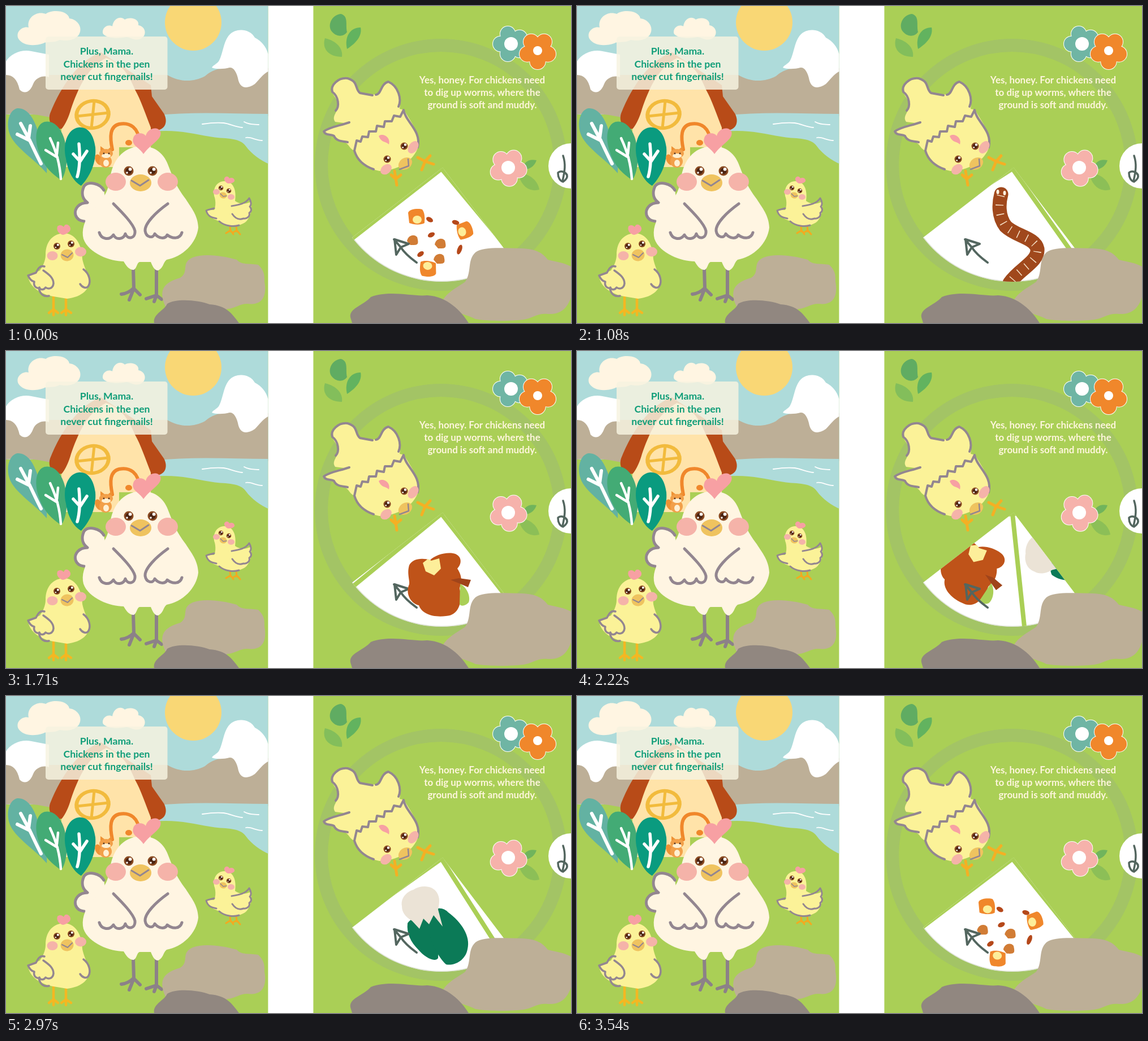
An HTML page with a canvas that plays this animation: 999x561 px, repeating every 4.17 s.

```html
<!DOCTYPE html>
<html lang="en">
<head>
<meta charset="utf-8">
<title>Chicken wheel book</title>
<style>
html, body { margin: 0; width: 100%; height: 100%; overflow: hidden; background: #fff; }
canvas { display: block; width: 999px; height: 561px; }
</style>
</head>
<body>
<canvas id="stage" width="999" height="561"></canvas>
<script>
const stage = document.getElementById('stage');
let g = stage.getContext('2d');
const GRASS = '#aacf56', LINE = '#938690', CREAM = '#fff5e2', CHICK = '#fbf298';
const PINK = '#f5b3a9', COMB = '#f7a0a3', SKY = '#aedbda', SAND = '#bdaf97';
const STONE = '#918780', ORANGE = '#f0872b', RUST = '#b84b18', INK = '#53665f';
const WALL = '#ffe3a9';
const LOOP = 4170, STEP = 30, HUB = [770, 288], RAD = Math.PI / 180;

function fill(color, d) {
  g.fillStyle = color;
  g.fill(new Path2D(d));
}
function line(color, width, d) {
  g.strokeStyle = color;
  g.lineWidth = width;
  g.lineCap = g.lineJoin = 'round';
  g.stroke(new Path2D(d));
}
function oval(color, x, y, rx, ry = rx, deg = 0) {
  g.fillStyle = color;
  g.beginPath();
  g.ellipse(x, y, rx, ry, deg * RAD, 0, 7);
  g.fill();
}
function eye(x, y, r) {
  oval('#8a4a22', x, y, r);
  oval('#4b2412', x, y, r * .65);
  oval('#fff', x + r * .3, y - r * .38, r * .34);
  oval('#fff', x - r * .35, y + r * .35, r * .2);
}
function text(rows, size, color, x, y, gap) {
  g.font = `bold ${size}px Lato, "Open Sans", sans-serif`;
  g.textAlign = 'center';
  g.fillStyle = color;
  rows.forEach((row, i) => g.fillText(row, x, y + i * gap));
}
function flower(x, y, r, color, deg, core) {
  for (const [c, extra] of [['#fff', 1], [color, 0]]) {
    for (let i = 0; i < 5; i++) {
      const a = (deg + i * 72) * RAD;
      oval(c, x + Math.cos(a) * r * .6, y + Math.sin(a) * r * .6, r * .43 + extra);
    }
    oval(c, x, y, r * .6);
  }
  oval('#fff', x, y, core);
}

function landscape() {
  fill(GRASS, 'M0 0H463.4V561H0Z');
  fill(SKY, 'M0 0H463.4V192H0Z');
  oval('#f9d775', 331, 29, 50);
  fill(CREAM, 'M22 58C16 45 30 35 40 38C36 20 55 8 70 14C82 5 110 8 112 22C128 24 137 40 128 52C120 62 105 62 95 60C85 66 72 62 66 66C48 72 30 70 22 58Z');
  fill(CREAM, 'M171 48C170 36 182 32 188 36C190 22 202 17 210 24C222 18 236 24 234 34C246 36 250 50 240 57C228 64 220 54 212 55C200 58 176 58 171 48Z');
  fill(SAND, 'M0 122H285C305 134 330 136 352 124C370 108 390 106 463.4 110V195C380 190 300 188 262 196L90 200C60 192 30 188 0 192Z');
  fill('#fff', 'M0 98C8 84 28 76 45 80L76 86V126C66 122 53 126 48 138C42 154 32 156 24 148C20 130 12 122 0 122Z');
  fill('#fff', 'M364 109C366 105 372 103 376 98C384 85 384 62 396 50C405 40 430 38 440 56C452 62 460 72 463.4 85V116C455 120 448 130 440 138C425 148 415 145 411 132C408 116 402 108 395 109C385 112 370 112 364 109Z');
  fill(SKY, 'M262 194C330 186 400 191 463.4 191V279C452 274 434 262 424 248C412 231 385 236 360 231C330 226 300 218 262 222Z');
  line('#fff', 1.8, 'M347 209C360 207 375 206 385 207C395 208 405 214 418 215M421 205C430 210 436 209 447 210M424 233C432 231 442 238 453 238');
}

function house() {
  fill(RUST, 'M168 82C130 95 98 140 78 190C73 205 83 221 99 217L236 190C240 205 250 219 265 220C284 219 286 202 279 190L258 160L256 140Z');
  fill(WALL, 'M177 92C142 110 127 148 115 182C111 196 106 208 98 218V285H200V250H256V215C248 195 238 165 228 148C215 115 200 100 177 92Z');
  oval('#f2bb3d', 153, 192, 32, 27, -10);
  oval(WALL, 153, 192, 25, 21, -10);
  line('#f2bb3d', 5, 'M156 168L151 216M126 195L181 189');
  line(ORANGE, 6, 'M188 254C183 230 184 213 200 209C220 205 234 216 236 240');
  oval(ORANGE, 217, 242, 6, 5);
  g.fillStyle = 'rgba(247,243,225,.84)';
  g.beginPath();
  g.roundRect(70, 54, 215.5, 94, 5);
  g.fill();
  text(['Plus, Mama.', 'Chickens in the pen', 'never cut fingernails!'], 17.6, '#0f9d78', 178, 86, 22.5);
}

function bushes() {
  fill('#63b2a2', 'M20 181C6 184 0 205 6 225C14 250 50 270 72 296C74 270 66 240 56 220C48 195 36 180 20 181Z');
  line('#fff', 6, 'M62 279C53 262 48 250 42 238M42 238L20 227M42 238L26 208M40 234L43 212');
  fill('#43ab75', 'M68 205C52 210 50 235 58 258C66 285 85 300 98 308C110 290 110 255 102 232C95 212 82 202 68 205Z');
  line('#fff', 4.5, 'M97 306C95 280 90 260 78 234M91 268L70 255M90 262L92 242');
  fill('#0a9b7f', 'M128 215C108 218 100 245 106 270C110 300 125 314 133 318C150 300 160 275 158 250C155 228 145 213 128 215Z');
  line('#fff', 5.5, 'M126 302C131 285 131 265 129 244M130 274L119 262M131 275L143 257');
  // squirrel
  oval('#ee9234', 164, 272, 6, 10, -25);
  oval('#f2a04a', 176, 275, 11, 11);
  fill('#ee9234', 'M167 260L167 248L175 254L180 254L187 248L187 262Z');
  oval('#f2a04a', 177, 261, 12, 8);
  oval('#fff0d2', 177, 265, 8, 4);
  oval('#fff0d2', 177, 278, 5, 6);
  oval('#50301f', 173, 261, 1.4);
  oval('#50301f', 182, 261, 1.4);
}

function hen() {
  const tail = 'M173 326C166 314 146 309 138 319C132 332 136 342 144 348C129 348 120 359 123 370C126 379 133 380 138 381';
  fill(CREAM, tail + 'L185 395Z');
  line(LINE, 5, tail);
  line('#8c8188', 6, 'M225 464L226 499M204 510C213 509 220 505 226 499M218 520L226 500L237 511M266 464V513M248 518L266 512L262 523M266 512L275 519');
  fill(CREAM, 'M238 248C205 250 188 275 184 305C180 335 165 350 152 363C138 378 133 398 137 412C146 438 185 452 208 452C213 460 217 467 226 467C232 463 231 455 236 453L256 453C259 460 262 468 269 468C279 463 277 455 284 449C312 444 337 420 340 392C339 370 328 358 318 342C300 318 296 305 288 285C280 260 262 247 238 248Z');
  line(LINE, 5, 'M190 350C205 365 225 385 228 398C229 412 215 414 211 403C208 413 195 415 190 405C182 416 168 412 165 401M286 350C265 365 245 385 246 398C248 410 260 412 263 403C270 412 282 413 285 405C295 413 308 412 311 401');
  fill(COMB, 'M243 262C236 250 221 247 225 234C228 222 244 224 247 230C250 216 268 212 273 222C277 236 258 242 243 262Z');
  oval(PINK, 194, 311, 18, 16);
  oval(PINK, 286, 311, 18, 16);
  eye(217, 292, 8.5);
  eye(259, 292, 8.5);
  oval('#efc35f', 238, 313, 19, 15);
  line(LINE, 3, 'M222 309L237 318L252 308');
}

function chicks() {
  line('#f4b722', 4.5, 'M84 512V540M76 543L84 537L92 543M84 537V547M106 512V540M98 543L106 537L115 543M106 537V547');
  fill(CHICK, 'M101 402C80 404 70 420 70 440C70 452 64 462 60 468L39 478C42 502 70 512 84 514L108 518C135 515 150 500 147 482C143 470 138 462 135 448C134 420 122 402 101 402Z');
  line(LINE, 3.5, 'M68 461C60 458 56 466 53 472L39 477C42 484 46 487 50 488C48 496 54 500 58 499C60 511 68 515 76 513M66 468C76 475 84 481 84 491C83 500 75 502 70 498C66 504 60 502 59 498M137 466C148 474 150 488 146 495C142 502 134 497 131 492');
  fill(COMB, 'M101 405C95 404 88 398 91 390C96 386 100 389 102 391C104 384 112 386 114 393C115 399 108 403 101 405Z');
  oval(PINK, 82, 442, 9.5, 8);
  oval(PINK, 132, 435, 10, 8.5);
  eye(90, 425, 6);
  eye(115, 421, 6);
  oval('#efc35f', 108, 441, 11.5, 10.5, -10);
  line(LINE, 2, 'M99 440L109 445L117 437');

  line('#f4a91f', 3, 'M396 390L397 399M389 402L397 397L402 404M407 390L408 399M401 401L408 397L414 404');
  fill(CHICK, 'M386 310C372 311 366 322 368 336C372 346 370 358 368 361L354 361C357 374 371 379 378 381C390 391 413 392 425 381C436 369 434 352 432 347C420 352 412 350 405 345C408 326 402 310 386 310Z');
  line(LINE, 3, 'M368 358C362 360 358 360 354 362C357 374 367 375 372 376M377 381C387 390 403 391 412 388M399 354C411 352 424 350 430 340C434 347 434 352 431 355C435 359 434 364 430 366C432 372 426 377 420 376C410 380 404 374 400 368');
  fill(COMB, 'M392 314C385 310 384 304 389 302C392 301 394 303 395 305C400 302 405 306 404 310C401 314 397 314 392 314Z');
  oval(PINK, 372, 329, 6, 5);
  oval(PINK, 398, 338, 6, 5);
  eye(380, 322, 4.3);
  eye(394, 327, 4.3);
  oval('#efc35f', 384, 335, 6.5, 5.5, 15);
  line(LINE, 1.5, 'M379 332L384 337L390 336');
}

function leftRocks() {
  fill(SAND, 'M282 532C270 505 276 490 308 481C325 470 308 455 330 445C350 437 385 442 408 449C417 459 430 455 446 458C458 470 457 478 457 488C462 515 452 530 428 527C415 526 405 535 392 536C375 545 350 545 330 535Z');
  fill(STONE, 'M262 561C259 545 280 539 285 527C300 517 340 520 360 528C390 530 400 545 412 561Z');
}

function meadow() {
  fill(GRASS, 'M543.4 0H999V561H543.4Z');
  g.strokeStyle = '#a3c465';
  g.lineWidth = 23;
  g.beginPath();
  g.arc(769, 281, 211.5, 0, 7);
  g.stroke();
  fill('#60ac62', 'M592 14C575 16 568 35 576 45C584 55 597 55 603 46C600 32 606 18 592 14Z');
  fill('#62b35f', 'M603 76C598 55 608 38 627 38C630 52 620 65 603 76Z');
  fill('#83be5b', 'M564 57C558 75 570 90 594 90C596 75 585 62 564 57Z');
  flower(893, 67, 31, '#6fb5a4', 36, 12);
  flower(940, 79, 32, ORANGE, 18, 8);
  fill('#70b45c', 'M912 290C916 275 925 270 938 273C934 285 924 290 912 290Z');
  fill('#8cbf57', 'M906 296C925 296 940 308 943 325C925 330 910 318 906 296Z');
  flower(888, 286, 32, '#f6b2ab', -60, 12);
  oval('#fff', 999, 283, 40);
  line(INK, 3.5, 'M985 265C990 280 988 292 984 310M976 295C981 290 989 294 992 299M976 296C976 304 980 310 985 311C991 307 994 302 991 298');
  text(['Yes, honey. For chickens need', 'to dig up worms, where the', 'ground is soft and muddy.'], 16.9, '#fff6dd', 842, 137, 22);
}

function diggingChick() {
  fill(CHICK, 'M577 150C575 130 600 124 612 130C622 136 618 147 624 154L656 157C662 155 664 135 676 134C692 142 700 160 696 182L704 184C712 200 732 222 729 248C722 275 690 292 660 292C640 288 620 272 616 256C608 254 606 243 598 241C588 240 584 232 578 230L562 222C575 212 590 210 598 207L582 205C576 196 584 190 586 182C590 165 577 160 577 150Z');
  line(LINE, 4, 'M583 185C590 178 588 160 577 152C573 140 588 126 604 128C624 134 616 146 626 154L648 158M654 157C664 156 662 138 676 134C694 142 700 165 694 178M607 206C590 212 572 214 562 222C565 230 574 226 580 230C584 240 596 239 604 241');
  line(LINE, 4, 'M650 289C630 282 620 270 616 256L620 238L627 240L630 231L640 232L642 222L654 222L656 212L668 214L670 204L682 204L686 194L697 196L703 184C706 205 735 220 728 250');
  line('#f4b024', 5, 'M687 292L691 317M681 299L689 306L698 299M728 268L741 275M735 290L741 275L756 280M741 275L750 265');
  fill(COMB, 'M659 230C666 224 681 232 677 245C672 239 664 243 659 230Z');
  oval(PINK, 672, 289, 11, 8, -40);
  oval(PINK, 720, 250, 8, 12, 35);
  eye(674, 271, 6.5);
  eye(704, 248, 6.5);
  oval('#efc35f', 706, 279, 13, 10, -35);
  line(LINE, 2.5, 'M696 289L712 283L711 271');
}

function corn(x, y, deg) {
  g.save();
  g.translate(x, y);
  g.rotate(deg * RAD);
  fill(ORANGE, 'M-15-6C-13-14 6-14 10-12C16-4 14 8 14 12C8 16-6 15-13 12Z');
  oval('#fdee9a', 1, 6, 8, 7);
  g.restore();
}
function seeds() {
  corn(726, 372, 0);
  corn(812, 397, 75);
  corn(746, 466, 185);
  for (const [x, y] of [[719, 414], [768, 420], [766, 447]]) {
    fill('#d17c35', `M${x - 10} ${y + 2}C${x - 8} ${y - 9} ${x + 3} ${y - 11} ${x + 8} ${y - 5}C${x + 12} ${y + 10} ${x + 8} ${y + 9} ${x - 4} ${y + 9}Z`);
  }
  for (const [x, y, a] of [[749, 378, 30], [795, 383, 15], [752, 405, -25], [733, 439, -35], [802, 431, -70]]) {
    oval('#b5481a', x, y, a < -60 ? 9 : 6.5, 4, a);
  }
}
function worm() {
  const d = 'M750 333C746 348 744 372 758 390C775 407 810 410 814 430C816 453 782 465 765 490';
  line('#a0481c', 25, d);
  g.setLineDash([1.5, 15]);
  g.lineDashOffset = -19;
  g.strokeStyle = '#f6e2c8';
  g.lineCap = 'butt';
  g.lineWidth = 14;
  g.stroke(new Path2D(d));
  g.setLineDash([]);
  oval('#fff2df', 744, 329, 2.5, 4);
  oval('#fff2df', 756, 331, 2.5, 4);
}
function apple() {
  fill('#bf5319', 'M713 379C718 368 735 365 750 370C758 362 775 356 790 358C805 360 808 375 798 385C808 400 805 410 802 420C808 445 800 468 778 469C755 472 735 465 730 450C718 448 706 432 712 415C716 410 708 395 713 379Z');
  fill('#fdee9a', 'M737 375L746 368L752 371L766 367L769 385L757 397L742 390Z');
  fill(GRASS, 'M803 412C815 418 822 435 818 445C812 452 804 452 802 448Z');
  fill('#a0441a', 'M786 405L801 402L822 405L817 418L803 412Z');
}
function eggplant() {
  fill('#0b7a57', 'M710 402C718 390 740 385 750 398C758 430 766 450 764 464C758 472 740 462 730 450C715 435 708 420 710 402Z');
  fill('#0b7a57', 'M750 385C760 371 775 375 782 383C805 400 822 425 816 448C812 470 790 478 778 475C762 460 745 425 745 400Z');
  fill('#ebe3d6', 'M700 372C697 355 712 345 720 343C735 333 755 336 762 348C768 358 766 368 764 378L772 408L756 388L748 404L738 394L731 412L718 398C705 390 700 382 700 372Z');
}

// start, steps, degrees of each turn
const turns = [[30, 25, 93], [1080, 22, 90], [2010, 22, 88], [2970, 20, 89.8]];
// wheel angle at which each drawing stands as drawn
const slices = [[seeds, 0], [worm, 97.1], [apple, 183], [eggplant, 275.5]];
const gaps = [-39.7, -132.4, -221, -308];

function angleAt(t) {
  return turns.reduce((sum, [start, steps, sweep]) => {
    const n = Math.floor((t - start) / STEP) + 1;
    return sum + sweep * Math.min(steps, Math.max(0, n)) / steps;
  }, 0);
}
function spun(deg, draw) {
  g.save();
  g.translate(...HUB);
  g.rotate(deg * RAD);
  g.translate(-HUB[0], -HUB[1]);
  draw();
  g.restore();
}
function pointer() {
  line(INK, 4, 'M726 454C715 446 705 438 698 427L686 413M690 440L687 413L712 421M690 440L698 427L712 421');
}
function wheel(t) {
  const angle = angleAt(t);
  const appleOnTop = t >= 1710 && t < 2010;
  g.save();
  g.clip(new Path2D('M772 286L454 532L992 576Z'));
  g.beginPath();
  g.arc(770, 289, 199, 0, 7);
  g.clip();
  g.fillStyle = '#fff';
  g.fill();
  g.strokeStyle = '#dfe3d8';
  g.lineWidth = 3;
  g.stroke();
  for (const gap of gaps) {
    spun(angle + gap, () => {
      g.fillStyle = GRASS;
      g.fillRect(HUB[0] - 4, HUB[1], 8, 205);
    });
  }
  if (appleOnTop) pointer();
  for (const [draw, rest] of slices) {
    const turn = ((angle - rest) % 360 + 540) % 360 - 180;
    if (Math.abs(turn) < 100) spun(turn, draw);
  }
  g.restore();
  if (!appleOnTop) pointer();
}
function rightRocks() {
  fill(SAND, 'M770 527C775 508 800 497 812 488C824 470 815 450 830 436C845 425 880 429 912 429C938 430 950 438 958 449C975 453 988 455 999 461V515C992 538 978 546 958 545C940 543 930 553 915 555C890 558 855 558 830 554C812 545 790 542 770 527Z');
  fill(STONE, 'M609 551C606 535 632 530 645 515C680 502 720 515 745 512C780 514 805 540 818 561H612Z');
}

function layer(...parts) {
  const c = document.createElement('canvas');
  c.width = 999;
  c.height = 561;
  const main = g;
  g = c.getContext('2d');
  parts.forEach(part => part());
  g = main;
  return c;
}
const back = layer(landscape, house, bushes, hen, chicks, leftRocks, meadow, diggingChick);
const front = layer(rightRocks);

function frame() {
  g.fillStyle = '#fff';
  g.fillRect(0, 0, 999, 561);
  g.drawImage(back, 0, 0);
  wheel(performance.now() % LOOP);
  g.drawImage(front, 0, 0);
  requestAnimationFrame(frame);
}
frame();
</script>
</body>
</html>
```
